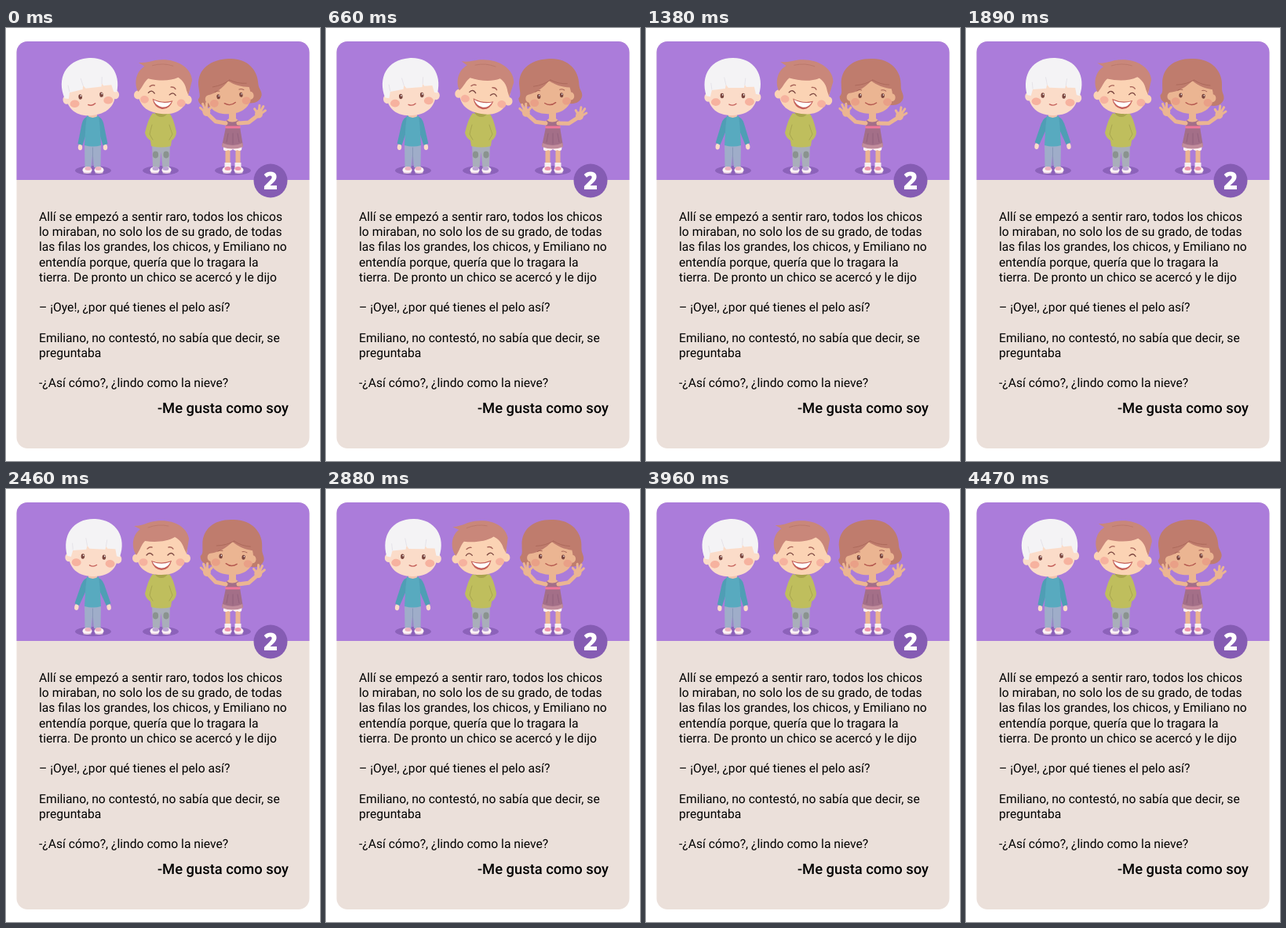
Animation of 400 by 550 pixels, one loop 4.5 s. Source, as an HTML page with a canvas:

```html
<!DOCTYPE html>
<html lang="es">
<head>
<meta charset="utf-8">
<style>
  html, body { margin: 0; width: 400px; height: 550px; overflow: hidden; background: #fff; }
  canvas, svg { position: absolute; left: 0; top: 0; width: 400px; height: 550px; }
  text { font-family: Roboto, sans-serif; font-size: 15.68px; fill: #000; white-space: pre; text-rendering: geometricPrecision; }
  .closing { font-size: 18.35px; font-weight: 500; text-anchor: end; }
  .badge { font: 800 31px "Open Sans", sans-serif; text-anchor: middle; fill: #fff; }
</style>
</head>
<body>
<canvas id="stage"></canvas>
<svg viewBox="0 0 400 550">
  <text x="42" y="245">Allí se empezó a sentir raro, todos los chicos</text>
  <text x="42" y="264.2">lo miraban, no solo los de su grado, de todas</text>
  <text x="42" y="283.4">las filas los grandes, los chicos, y Emiliano no</text>
  <text x="42" y="302.6">entendía porque, quería que lo tragara la</text>
  <text x="42" y="321.8">tierra. De pronto un chico se acercó y le dijo</text>
  <text x="42" y="360.2">– ¡Oye!, ¿por qué tienes el pelo así?</text>
  <text x="42" y="398.6">Emiliano, no contestó, no sabía que decir, se</text>
  <text x="42" y="417.8">preguntaba</text>
  <text x="42" y="456.2">-¿Así cómo?, ¿lindo como la nieve?</text>
  <text class="closing" x="360" y="489">-Me gusta como soy</text>
  <text class="badge" x="337" y="205">2</text>
</svg>
<script>
const LOOP = 4500, STEP = 30;
const canvas = document.getElementById('stage');
const ctx = canvas.getContext('2d');
const ratio = window.devicePixelRatio || 1;
canvas.width = 400 * ratio;
canvas.height = 550 * ratio;

const PALE = '#fbdcc9', PEACH = '#fbd3b4', TAN = '#ebb592';
const BLUSH = '#f6b29f', BROWN = '#c9877a', CHESTNUT = '#bf7c6d', DARK = '#7b463f';

function fill(d, color) {
  ctx.fillStyle = color;
  ctx.fill(new Path2D(d));
}

function line(d, color, width) {
  ctx.strokeStyle = color;
  ctx.lineWidth = width;
  ctx.lineCap = ctx.lineJoin = 'round';
  ctx.stroke(new Path2D(d));
}

function oval(x, y, rx, ry, color) {
  ctx.fillStyle = color;
  ctx.beginPath();
  ctx.ellipse(x, y, rx, ry, 0, 0, Math.PI * 2);
  ctx.fill();
}

function pair(x1, x2, y, rx, ry, color) {
  oval(x1, y, rx, ry, color);
  oval(x2, y, rx, ry, color);
}

function turned(x, y, degrees, draw) {
  ctx.save();
  ctx.translate(x, y);
  ctx.rotate(degrees * Math.PI / 180);
  ctx.translate(-x, -y);
  draw();
  ctx.restore();
}

// Swings between two values, reaching `high` at time `peak`.
function swing(t, low, high, peak) {
  const c = Math.cos((t - peak) / LOOP * Math.PI * 2);
  return (low + high) / 2 + (high - low) / 2 * c;
}

function shoes(x, color) {
  for (const side of [-1, 1]) {
    const cx = x + side * 7.5;
    oval(cx, 180.5, 6, 4.2, '#fdf3f6');
    oval(cx - side, 178.5, 4, 2.5, color);
    line(`M${cx - 4.5} 183.8h9`, '#e3cbdc', 1.2);
  }
}

function card() {
  ctx.save();
  ctx.beginPath();
  ctx.roundRect(13.5, 17, 373, 517, 14);
  ctx.clip();
  ctx.fillStyle = '#ebe0da';
  ctx.fillRect(13, 17, 374, 517);
  ctx.fillStyle = '#ab7cda';
  ctx.fillRect(13, 17, 374, 176);
  ctx.restore();
  oval(337, 194, 21.5, 21.5, '#855cb3');
  for (const x of [111, 197, 289]) oval(x, 181, 23, 6, '#8c62ba');
}

function whiteHairedBoy(t) {
  fill('M100 146H121L120.5 177H112L110.5 156L108.5 177H100.500Z', '#9fadc9');
  line('M110.500 152V174', '#8796b6', 1);
  shoes(111, '#eeb4c0');

  const spread = swing(t, 0, 8, 2250);
  for (const side of [-1, 1]) {
    const at = v => 110.5 + side * v;
    turned(at(8), 117, -side * spread, () => {
      oval(at(16), 151.5, 2.7, 3.8, PALE);
      fill(`M${at(5)} 112Q${at(12)} 113 ${at(14)} 122L${at(19)} 147L${at(13)} 149L${at(6)} 126Z`, '#4f9eb5');
    });
  }
  fill('M105 106H116V115H105Z', '#f0c3ad');
  fill('M103 111Q110.500 117 118 111L119.500 124L121 149Q111 152 100 149L101.500 124Z', '#58aabf');

  turned(110, 109, swing(t, -6, 2.5, 2250), () => {
    pair(79, 142, 88, 4.5, 5.5, PALE);
    fill('M78 72C76 101 90 111 110 111C132 111 145 99 142 72Z', PALE);
    fill('M77 86C69 60 83 38 111 38C138 38 152 60 144 85L140 84L138 75L128 75L126 72L125 76L105 76L102 72L101 77L84 79L82 87Z', '#f4f3f5');
    line('M102 72L100 63M126 72L127 64M84 78L83 70', '#e2dfe6', .8);
    pair(89, 132, 94, 6, 4.8, BLUSH);
    pair(97, 124, 86, 2.3, 3.2, DARK);
    pair(97.7, 124.7, 84.8, .8, .9, '#fff');
    line('M106 97q5 2.500 9-.7', '#c4605a', 1.4);
  });
}

function laughingBoy(t) {
  fill('M186 147H209L208 177H199.500L197.500 157L195.500 177H187Z', '#a9aeba');
  pair(190.5, 204, 161, 3.6, 4.4, '#8a938f');
  shoes(197, '#bba4d3');
  fill('M187 108Q198 113 208 108Q213 113 217 132Q217 139 211 143L210 150Q198 153 185 150L184 143Q178 139 177 133Q181 115 187 108Z', '#bfbe5d');
  line('M186 123Q184 130 183 135L187 142M208 123Q210 130 212 135L208 142', '#a8a64e', 1);
  fill('M189 107Q198 104 207 107Q203 113 198 113Q192 113 189 107Z', '#a9a44c');

  turned(198, 107, swing(t, -2, 9, 850), () => {
    pair(166, 230, 88, 5, 5.5, PEACH);
    fill('M167 66C161 99 177 109 198 109C220 109 234 98 230 62L198 50Z', PEACH);
    fill('M166 84C159 73 161 58 171 51L163 47C171 47 178 44 184 42C207 36 230 45 233 63L230 82L227 76C225 69 221 64 215 61C205 67 190 68 177 66C172 71 171 78 166 84Z', BROWN);
    line('M181 49Q194 44 207 47', '#b8766a', .8);
    pair(175, 222, 93, 5.5, 4.8, BLUSH);
    line('M179 84q4-5 8 0M206 84q4.500-5 8 0', DARK, 1.3);
    line('M180 76q3-3 6-2M207 74q4-1 6 2', '#a9655a', 1.4);
    fill('M185 91Q198 96 211 91Q208 103 198 103Q188 102 185 91Z', '#c4605a');
    fill('M186.500 92.500Q198 97 209.500 92.500Q206 100.500 198 100.500Q190 99.500 186.500 92.500Z', '#fff');
  });
}

function girlArm(side, lift) {
  const at = v => 288 + side * v;
  turned(at(8), 121, -side * lift, () => {
    line(`M${at(8)} 121L${at(21)} 119L${at(32)} 109`, TAN, 5);
    oval(at(33), 107, 5, 5.5, TAN);
    line(`M${at(32)} 107L${at(27)} 101M${at(33)} 106L${at(33)} 96M${at(34)} 106L${at(38)} 97M${at(34)} 108L${at(41)} 102`, TAN, 3);
  });
}

function girl(t) {
  line('M282.500 152V176M295.500 152V176', TAN, 6);
  fill('M278.500 171h8v7h-8ZM291.500 171h8v7h-8Z', '#f7edf0');
  shoes(289, '#ee93aa');
  fill('M277 147H301L300 155Q297 157 295 155Q292 157 289 154Q286 157 283 155Q280 157 277 155Z', '#fff3f3');
  fill('M284 106H293V115L298 119V123H279V119L284 115Z', TAN);
  fill('M281 117Q288 122 296 117L298 126H280Z', '#a36f88');
  fill('M280 126H298L302 150Q289 156 275 150Z', '#a36f88');
  fill('M275.800 146Q289 152 301.300 146L302 151Q289 156 275 151Z', '#c18c9c');
  line('M283 134L281 145M289 134V147M295 134L297 145', '#8f5e7a', .8);
  line('M280.500 126H297.500', '#f0789a', 2.8);

  turned(287, 109, swing(t, -5, 3, 2250), () => {
    ctx.translate(-1.5, 0);
    fill('M288 39C312 38 327 54 326 74C326 81 330 83 329 89C326 99 314 99 308 96L268 97C258 100 248 96 248 87C252 84 250 79 250 72C249 52 264 39 288 39Z', CHESTNUT);
    pair(261, 315, 88, 4, 5, TAN);
    fill('M261 83C272 81 281 75 288 67C296 73 304 76 314 77C320 98 306 109 288 109C270 109 258 101 261 83Z', TAN);
    line('M290 66Q281 72 268 73M290 66Q300 72 311 72', '#a96658', .8);
    pair(268, 309, 94, 5.5, 4.8, '#e9a087');
    pair(274, 303, 86, 2.2, 3, DARK);
    pair(274.7, 303.7, 85, .7, .8, '#fff');
    line('M270 80q3-2 6-1M301 79q3-1 6 1', '#a96658', 1);
    line('M281 95q7 5 14 0', '#b4584f', 1.4);
  });

  girlArm(-1, swing(t, -1, 5, 3200));
  girlArm(1, swing(t, -11, 3, 3300));
}

function render(now) {
  const t = Math.floor(now % LOOP / STEP) * STEP;
  ctx.setTransform(ratio, 0, 0, ratio, 0, 0);
  ctx.clearRect(0, 0, 400, 550);
  card();
  whiteHairedBoy(t);
  laughingBoy(t);
  girl(t);
  requestAnimationFrame(() => render(performance.now() - start));
}

const start = performance.now();
render(0);
</script>
</body>
</html>
```
